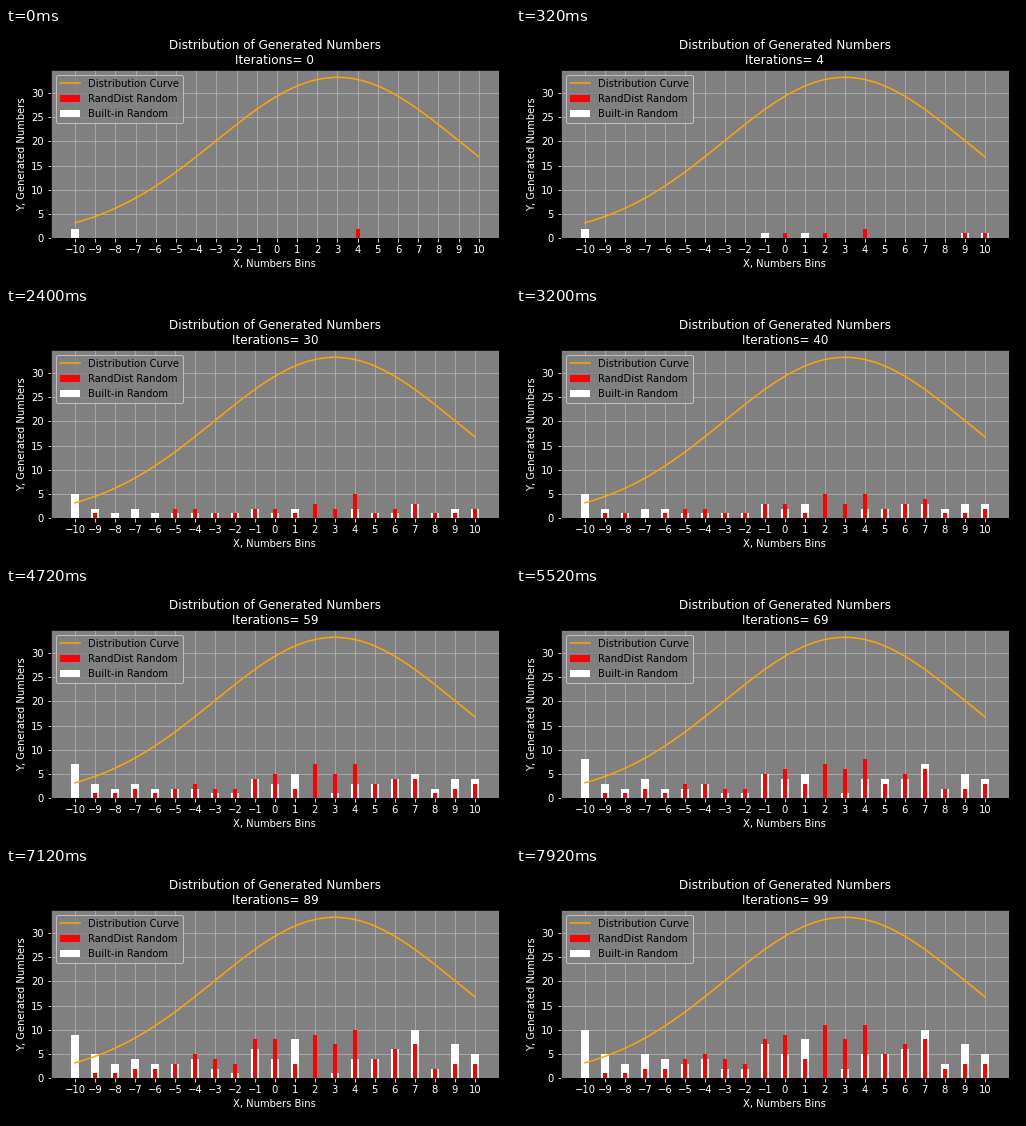
These frames come from a looping animation (504x252 px, 8000 ms). A matplotlib script:

```python
import matplotlib.pyplot as plt
import numpy as np
from matplotlib.animation import FuncAnimation

FRAMES, INTERVAL = 100, 80
MEAN, SIGMA, SAMPLES = 3, 6, 500
BINS = np.arange(-10, 11)
WIDE, NARROW = 0.4, 0.2

# Closing bar heights, one per bin.
BUILTIN = [10, 5, 3, 5, 4, 3, 4, 2, 2, 7, 5, 8, 0, 2, 5, 5, 6, 10, 3, 7, 5]
RANDDIST = [0, 1, 1, 2, 2, 4, 5, 4, 3, 8, 9, 4, 11, 8, 11, 5, 7, 8, 2, 3, 3]


def draw_order(totals, opening, seed):
    """Start with the opening draws, then fill every bin at a jittered steady pace."""
    rng = np.random.default_rng(seed)
    queue = []
    for number, total in zip(BINS, totals):
        left = total - opening.count(number)
        queue += [((i + rng.random()) / left, number) for i in range(left)]
    return opening + [number for _, number in sorted(queue)]


def counts(draws, frame):
    # Two numbers are already drawn when the first frame shows.
    return np.bincount(np.array(draws[:frame + 2]) + 10, minlength=len(BINS))


def set_heights(bars, heights):
    for bar, height in zip(bars, heights):
        bar.set_height(height)


white_draws = draw_order(BUILTIN, [-10, -10, 10], seed=1)
red_draws = draw_order(RANDDIST, [4, 4, 10], seed=2)

plt.rcParams["font.family"] = "DejaVu Sans"
fig, ax = plt.subplots(figsize=(7, 3.5), dpi=72, facecolor="black")
ax.set_facecolor("gray")
ax.set_axisbelow(True)
ax.grid(True)
ax.tick_params(colors="white")

x = np.linspace(-10, 10, 201)
peak = SAMPLES / (SIGMA * np.sqrt(2 * np.pi))
curve, = ax.plot(x, peak * np.exp(-((x - MEAN) / SIGMA) ** 2 / 2), color="orange")
white_bars = ax.bar(BINS, np.zeros(len(BINS)), WIDE, color="white")
red_bars = ax.bar(BINS, np.zeros(len(BINS)), NARROW, color="red")

ax.set_xticks(BINS)
ax.set_yticks(range(0, 31, 5))
ax.set_ylim(0, 34.8)
ax.set_xlabel("X, Numbers Bins", color="white")
ax.set_ylabel("Y, Generated Numbers", color="white")
ax.legend([curve, red_bars, white_bars],
          ["Distribution Curve", "RandDist Random", "Built-in Random"],
          loc="upper left", facecolor="gray")


def update(frame):
    white, red = counts(white_draws, frame), counts(red_draws, frame)
    set_heights(white_bars, white)
    set_heights(red_bars, red)
    # The view widens once a bar extends past the end of the curve.
    left = -10 - WIDE / 2
    right = 10 + (WIDE / 2 if white[-1] else NARROW / 2 if red[-1] else 0)
    margin = 0.05 * (right - left)
    ax.set_xlim(left - margin, right + margin)
    ax.set_title(f"Distribution of Generated Numbers\nIterations= {frame}",
                 color="white")


update(0)
fig.tight_layout()
animation = FuncAnimation(fig, update, frames=FRAMES, interval=INTERVAL,
                          repeat=True, repeat_delay=0)
plt.show()
```
